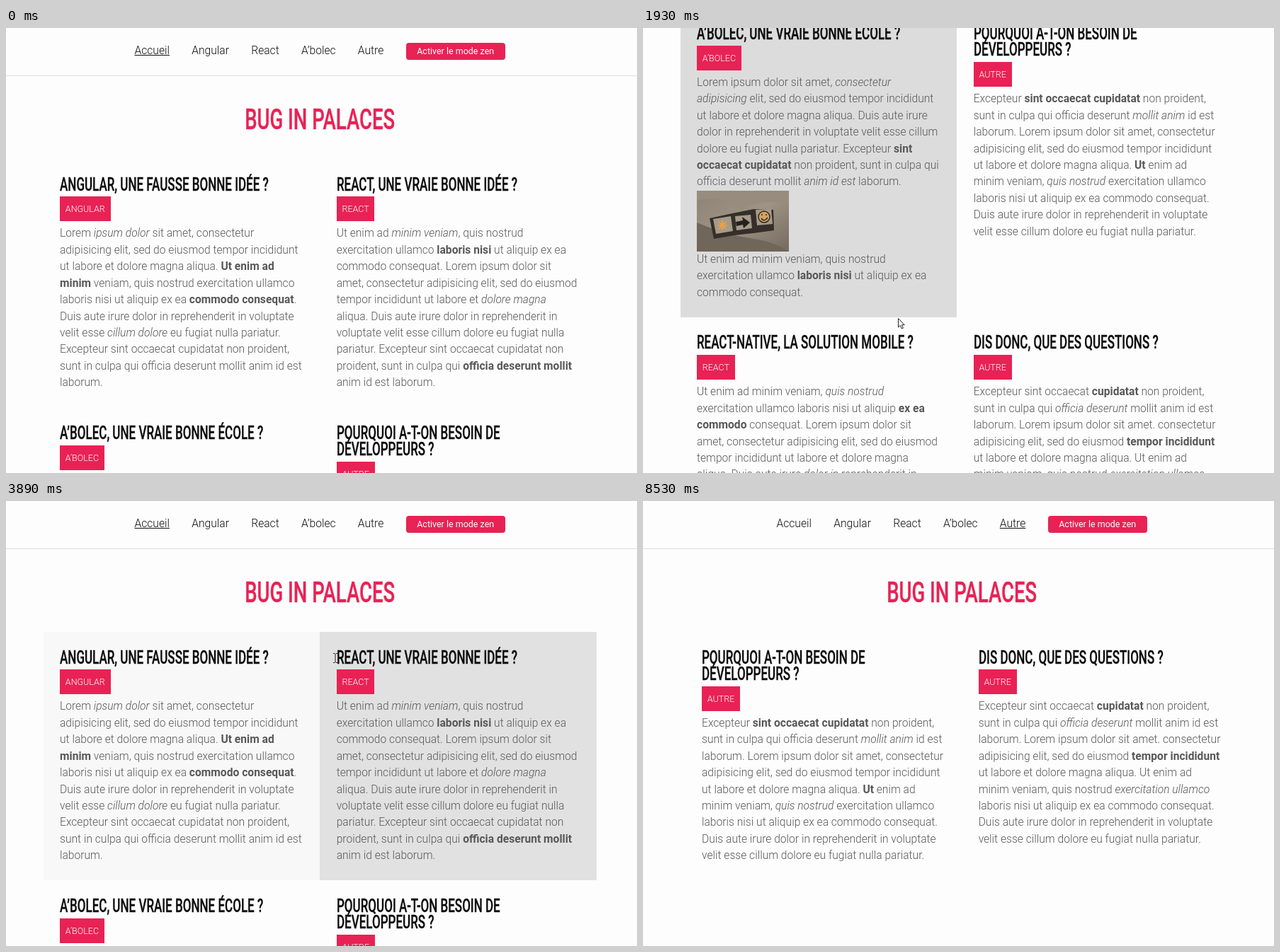
These frames come from a looping animation (891x629 px, 9540 ms). An HTML page:

```html
<!DOCTYPE html>
<html lang="fr">
<head>
<meta charset="utf-8">
<title>Bug in palaces</title>
<style>
:root { --pink: #e82254; font: 300 15.625px/1.5 Roboto, sans-serif; }
html, body { margin: 0; width: 891px; height: 629px; overflow: hidden; background: #fdfdfd; }
body { position: relative; }
#page { position: absolute; left: 0; top: 0; width: 886.4px; }
header { position: relative; height: 67.5px; }
header::after { content: ""; position: absolute; left: -20px; top: 67px; width: 940px; height: 1px; background: #ddd; }
nav { display: flex; justify-content: center; align-items: center; gap: 2rem; height: 66px; color: #111; white-space: nowrap; }
nav .active { text-decoration: underline; }
nav .hot { color: var(--pink); }
#zen { padding: 0 1rem; border-radius: 4px; background: var(--pink); color: #fff; font-size: .8rem; font-weight: 400; line-height: 1.5rem; }
#zen.hot { background: #c91c47; color: #fff; }
/* Condensed display face for all headings */
h1, h2 { position: relative; top: .5px; font-weight: 500; text-transform: uppercase; transform: scaleX(.68); -webkit-text-stroke: .35px; }
h1 { margin: 31px 0 26.5px; color: var(--pink); font-size: 40.5px; line-height: 60px; text-align: center; }
h2 { width: 145%; margin: 0; color: #0c0c0c; font-size: 25px; line-height: 1.5rem; transform-origin: 0 0; }
main { display: flex; flex-wrap: wrap; width: 50rem; margin: 0 auto; }
article { box-sizing: border-box; width: 25rem; padding: 24px 1.5rem 22.8px; }
h2, p { white-space: pre-line; }
p { margin: 0; color: #585858; }
b { font-weight: 700; }
.tag { width: fit-content; margin: .375rem 0; padding: .375rem .5rem; background: var(--pink); color: #fff; font-size: .8rem; line-height: 1.5rem; text-transform: uppercase; }
.photo { display: block; width: 130px; height: 5.5rem; }
.single article { width: 50rem; }
.single h2, .single p { white-space: normal; }
#cursor { position: absolute; left: 0; top: 0; width: 1px; height: 1px; overflow: visible; }
</style>
</head>
<body>
<div id="page">
  <header><nav>
    <span id="home">Accueil</span><span>Angular</span><span>React</span><span>A’bolec</span><span id="other">Autre</span><span id="zen"></span>
  </nav></header>
  <h1>Bug in palaces</h1>
  <main></main>
</div>
<svg id="cursor" fill="#fff" stroke="#222">
  <g id="beam" fill="none"><path d="M-3-6.5H-1L0-5.5 1-6.5H3M0-5.5V5.5M-3 6.5H-1L0 5.5 1 6.5H3"/></g>
  <g id="arrow"><path d="M.5.5V13L3.3 10.4 5.3 15 7.4 14.1 5.4 9.6H9.2Z"/></g>
  <g id="hand"><path d="M-2 11V1.5Q-2 0-.5 0T1 1.5V6Q3.5 5 4 7 6 6 6.5 8 8.5 7.5 8.5 9.5V13L7 16V18.5H-1V16.5L-5 11.5Q-5.5 9.5-3.5 10Z"/><path d="M1 6V10M4 7V10M6.5 8V10.5" fill="none"/></g>
</svg>
<script>
const $ = selector => document.querySelector(selector);

const photo = `<svg class="photo" viewBox="0 0 130 86" preserveAspectRatio="none">
<defs><linearGradient id="cloth" x2="1" y2="1"><stop stop-color="#8d8274"/><stop offset=".5" stop-color="#9e9384"/><stop offset="1" stop-color="#746a5e"/></linearGradient></defs>
<path d="M0 0H130V86H0Z" fill="url(#cloth)"/>
<path d="M0 45Q40 62 75 67T130 86H0Z" fill="#70665a"/><path d="M0 14Q45 5 62 30 85 8 130 20V0H0Z" fill="#978c7d"/>
<path d="M18 39L24 68 53 63 80 60 109 56 108 27 80 26 50 32Z" fill="#352f2a"/>
<g fill="#a69b8a"><path d="M23 40L48 36 51 57 27 61Z"/><path d="M54 36L76 34 78 53 56 56Z"/><path d="M83 27L105 26 107 47 85 49Z"/></g>
<path d="M30 49H43M36 42V56M31 44L41 54M41 44L31 54" stroke="#e8a04a" stroke-width="2"/>
<path d="M55 44L65 42 64 37 75 45 66 53 65 48 56 50Z" fill="#24221f"/>
<circle cx="95" cy="37" r="8" fill="#cfa468" stroke="#38291d" stroke-width="1.5"/>
<path d="M91 39Q95 45 100 38M92 33V35M98 33V35" fill="none" stroke="#38291d" stroke-width="1.5"/></svg>`;

const posts = [
  ['Angular, une fausse bonne idée ?', 'Angular', `Lorem <i>ipsum dolor</i> sit amet, consectetur
adipisicing elit, sed do eiusmod tempor incididunt
ut labore et dolore magna aliqua. <b>Ut enim ad
minim</b> veniam, quis nostrud exercitation ullamco
laboris nisi ut aliquip ex ea <b>commodo consequat</b>.
Duis aute irure dolor in reprehenderit in voluptate
velit esse <i>cillum dolore</i> eu fugiat nulla pariatur.
Excepteur sint occaecat cupidatat non proident,
sunt in culpa qui officia deserunt mollit anim id est
laborum.`],
  ['React, une vraie bonne idée ?', 'React', `Ut enim ad <i>minim veniam</i>, quis nostrud
exercitation ullamco <b>laboris nisi</b> ut aliquip ex ea
commodo consequat. Lorem ipsum dolor sit
amet, consectetur adipisicing elit, sed do eiusmod
tempor incididunt ut labore et <i>dolore magna</i>
aliqua. Duis aute irure dolor in reprehenderit in
voluptate velit esse cillum dolore eu fugiat nulla
pariatur. Excepteur sint occaecat cupidatat non
proident, sunt in culpa qui <b>officia deserunt mollit</b>
anim id est laborum.`],
  ['A’bolec, une vraie bonne école ?', 'A’bolec', `Lorem ipsum dolor sit amet, <i>consectetur
adipisicing</i> elit, sed do eiusmod tempor incididunt
ut labore et dolore magna aliqua. Duis aute irure
dolor in reprehenderit in voluptate velit esse cillum
dolore eu fugiat nulla pariatur. Excepteur <b>sint
occaecat cupidatat</b> non proident, sunt in culpa qui
officia deserunt mollit <i>anim id est</i> laborum.${photo}Ut enim ad minim veniam, quis nostrud
exercitation ullamco <b>laboris nisi</b> ut aliquip ex ea
commodo consequat.`],
  ['Pourquoi a-t-on besoin de\ndéveloppeurs ?', 'Autre', `Excepteur <b>sint occaecat cupidatat</b> non proident,
sunt in culpa qui officia deserunt <i>mollit anim</i> id est
laborum. Lorem ipsum dolor sit amet, consectetur
adipisicing elit, sed do eiusmod tempor incididunt
ut labore et dolore magna aliqua. <b>Ut</b> enim ad
minim veniam, <i>quis nostrud</i> exercitation ullamco
laboris nisi ut aliquip ex ea commodo consequat.
Duis aute irure dolor in reprehenderit in voluptate
velit esse cillum dolore eu fugiat nulla pariatur.`],
  ['React-Native, la solution mobile ?', 'React', `Ut enim ad minim veniam, <i>quis nostrud</i>
exercitation ullamco laboris nisi ut aliquip <b>ex ea
commodo</b> consequat. Lorem ipsum dolor sit
amet, consectetur adipisicing elit, sed do eiusmod
tempor incididunt ut labore et dolore magna
aliqua. Duis aute irure <i>dolor in</i> reprehenderit in
voluptate velit esse cillum dolore eu fugiat nulla
pariatur. Excepteur <b>sint occaecat</b> cupidatat non
proident, sunt in culpa qui officia deserunt mollit
anim id est laborum.`],
  ['Dis donc, que des questions ?', 'Autre', `Excepteur sint occaecat <b>cupidatat</b> non proident,
sunt in culpa qui <i>officia deserunt</i> mollit anim id est
laborum. Lorem ipsum dolor sit amet. consectetur
adipisicing elit, sed do eiusmod <b>tempor incididunt</b>
ut labore et dolore magna aliqua. Ut enim ad
minim veniam, quis nostrud <i>exercitation ullamco</i>
laboris nisi ut aliquip ex ea commodo consequat.
Duis aute irure dolor in reprehenderit in voluptate
velit esse cillum dolore eu fugiat nulla pariatur.`],
];
$('main').innerHTML = posts.map(([title, tag, text]) =>
  `<article><h2>${title}</h2><div class="tag">${tag}</div><p>${text}</p></article>`).join('');
const cards = [...document.querySelectorAll('article')];

// Keys: [time, values...]
const scrollKeys = [[770, 0], [840, 30], [980, 140], [1530, 488], [1730, 488], [1930, 565],
  [2000, 586], [2250, 586], [2400, 675], [2540, 683], [2680, 683], [3200, 0]];
const cursorKeys = [[500, 650, 335], [570, 500, 352], [640, 405, 366], [700, 376, 369], [1730, 376, 369],
  [1930, 360, 409.5], [2610, 357, 438], [3480, 357, 438], [3760, 440, 290], [4070, 500, 130],
  [4370, 517, 41.5], [6230, 517, 41.5], [6440, 590, 38], [6650, 650, 36], [8390, 650, 36], [8460, 714, 46]];
const cursorKinds = [[0, ''], [500, 'beam'], [1730, 'arrow'], [2250, 'beam'], [3900, 'arrow'], [4230, 'hand'],
  [6300, 'arrow'], [6440, 'hand'], [8460, 'arrow'], [8530, '']];
// Card index, pointer enters, pointer leaves
const hovers = [[1, 450, 540], [0, 540, 1300], [2, 1300, 2250], [4, 2250, 2850], [0, 3440, 3760], [1, 3760, 3980]];
const FADE = 160, LOOP = 9540;

const clamp = x => Math.max(0, Math.min(1, x));
const within = (t, from, to) => t >= from && t < to;

function track(keys, t) {
  const next = keys.findIndex(key => key[0] > t);
  if (next < 0) return keys.at(-1).slice(1);
  const b = keys[next], a = keys[Math.max(0, next - 1)];
  const k = clamp((t - a[0]) / (b[0] - a[0] || 1));
  return a.slice(1).map((v, i) => v + (b[i + 1] - v) * k);
}

function hoverLevel(card, t) {
  const rise = since => clamp((t - since) / FADE);
  return Math.max(...hovers.map(([index, enter, leave]) =>
    index === card ? rise(enter) * (1 - rise(leave)) : 0));
}

function draw(t) {
  const filtered = t >= 4440, loading = within(t, 4440, 4980), zen = within(t, 6850, 8000);
  const [scroll] = track(scrollKeys, t);
  // Without a scrollbar the centred page sits further right
  $('#page').style.transform = `translate(${filtered && !zen ? 7 : 0}px, ${-Math.round(scroll)}px)`;
  $('main').classList.toggle('single', zen);
  $('#home').classList.toggle('active', !filtered);
  $('#other').classList.toggle('active', filtered);
  $('#other').classList.toggle('hot', within(t, 4230, 6300));
  $('#zen').classList.toggle('hot', within(t, 6440, 8460));
  $('#zen').textContent = zen ? 'Désactiver le mode zen' : 'Activer le mode zen';
  cards.forEach((card, i) => {
    card.style.display = loading || filtered && posts[i][1] !== 'Autre' ? 'none' : '';
    card.style.background = `rgb(220 220 220 / ${hoverLevel(i, t)})`;
  });
  const kind = cursorKinds.findLast(([from]) => from <= t)[1];
  const [x, y] = track(cursorKeys, t).map(Math.round);
  for (const shape of $('#cursor').children) shape.style.display = shape.id === kind ? '' : 'none';
  $('#cursor').style.transform = `translate(${x}px, ${y}px)`;
}

function frame() {
  draw(performance.now() % LOOP);
  requestAnimationFrame(frame);
}
frame();
</script>
</body>
</html>
```
